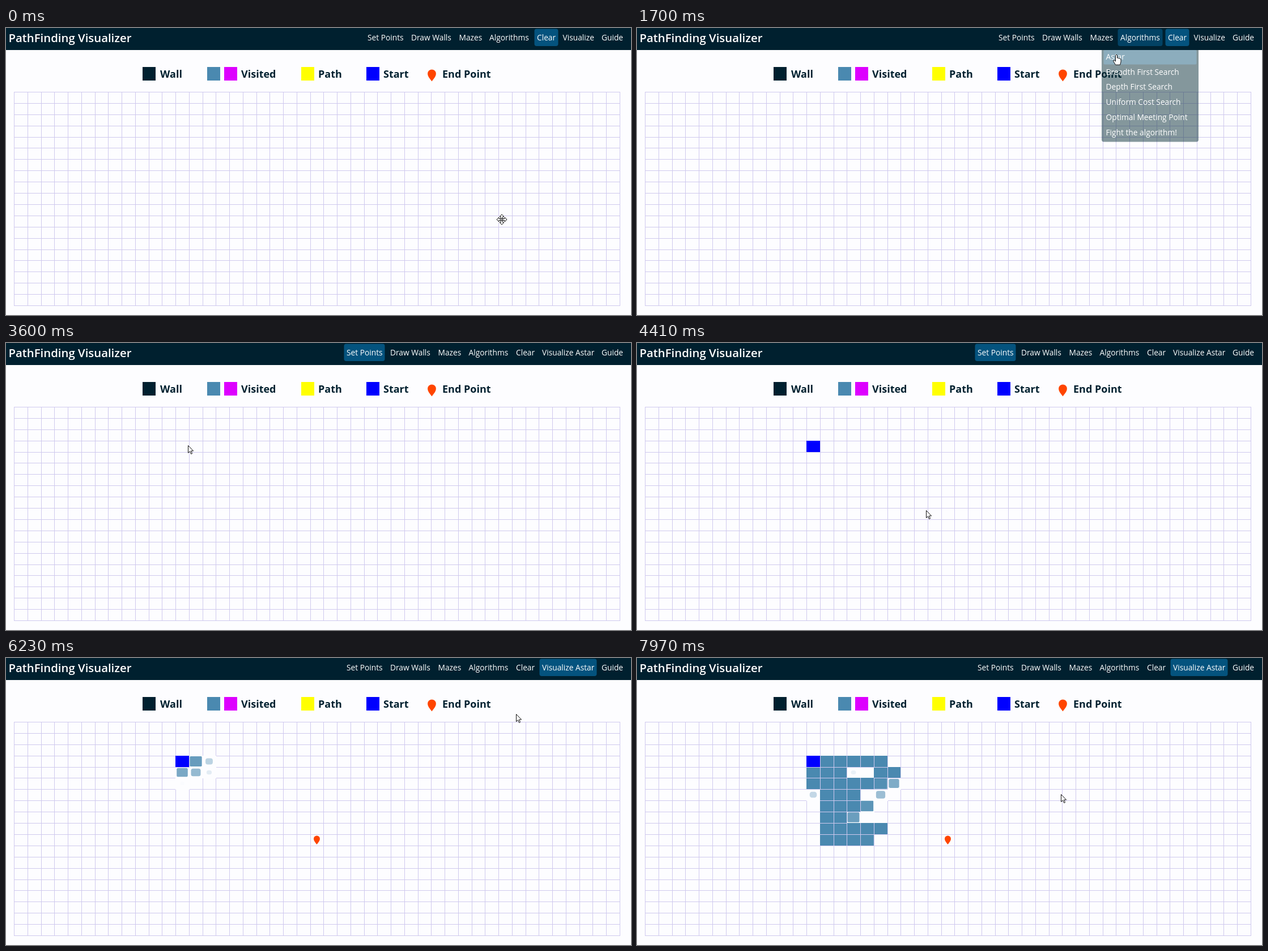
Write an HTML page that moves like this. It is 1103 px wide and 508 px high and loops after 8 s.

```html
<!DOCTYPE html>
<html lang="en">
<head>
<meta charset="utf-8">
<title>PathFinding Visualizer</title>
<style>
  html, body { margin: 0; width: 100%; height: 100%; overflow: hidden; background: #fdfdff; }
  svg { display: block; width: 1103px; height: 508px; font-family: "Open Sans", "Noto Sans", sans-serif; }
  text { white-space: pre; }
  .title { font-size: 20.35px; font-weight: 600; fill: #fff; }
  .item { font-size: 13.75px; fill: #fff; }
  .label { font-size: 18px; font-weight: 700; fill: #00202f; }
</style>
</head>
<body>
<svg id="stage" viewBox="0 0 1103 508"></svg>
<script>
const LOOP = 8000;
const DARK = '#00202f', ACTIVE = '#04537e', VISITED = '#4a89b0', PAPER = '#fdfdff', BLUE = '#0000ff';
const LINE = '#cfc9ee';
const COLS = 45, ROWS = 19, LEFT = 14, TOP = 113, CELL_W = 1069 / COLS, CELL_H = 378 / ROWS;
const PIN = 'M0 10.5C-3 6.3-7.4 1.8-7.4-3.2a7.4 7.4 0 0 1 14.8 0C7.4 1.8 3 6.3 0 10.5Z';

const stage = document.getElementById('stage');

function add(parent, tag, attrs = {}, text) {
  const el = document.createElementNS('http://www.w3.org/2000/svg', tag);
  set(el, attrs);
  if (text) el.textContent = text;
  parent.append(el);
  return el;
}
function set(el, attrs) {
  for (const key in attrs) el.setAttribute(key, attrs[key]);
}
const group = () => add(stage, 'g');
const show = (el, on) => set(el, { opacity: +on });
const clamp = v => Math.max(0, Math.min(1, v));
const ramp = (t, from, to) => clamp((t - from) / (to - from));
const gridX = col => Math.round(LEFT + col * CELL_W);
const gridY = row => Math.round(TOP + row * CELL_H);

// CSS "ease": cubic-bezier(.25, .1, .25, 1)
function ease(p) {
  const bezier = (u, a, b) => 3 * u * (1 - u) ** 2 * a + 3 * u * u * (1 - u) * b + u ** 3;
  let lo = 0, hi = 1;
  for (let i = 0; i < 14; i++) {
    const mid = (lo + hi) / 2;
    if (bezier(mid, .25, .25) < p) lo = mid; else hi = mid;
  }
  return bezier(lo, .1, 1);
}

// Grid
let lines = '';
for (let c = 0; c <= COLS; c++) lines += `M${gridX(c) + .5} ${TOP}V${gridY(ROWS) + 1}`;
for (let r = 0; r <= ROWS; r++) lines += `M${LEFT} ${gridY(r) + .5}H${gridX(COLS) + 1}`;
add(stage, 'path', { d: lines, stroke: LINE, fill: 'none' });

// Cells: a letter for the column ("a" = 12) and a row number
const blankLayer = group(), cellLayer = group(), edgeLayer = group();

function cellBox(name) {
  const col = name.charCodeAt(0) - 85, row = +name.slice(1);
  const x = gridX(col), y = gridY(row);
  return { x, y, width: gridX(col + 1) - x, height: gridY(row + 1) - y };
}
function addBlank({ x, y, width, height }) {
  return add(blankLayer, 'rect', { x, y, width: width + 1, height: height + 1, fill: PAPER });
}
// A filled cell hides its left and top lines; its right and bottom lines stay on top
function addEdge({ x, y, width, height }) {
  const d = `M${x + width + .5} ${y}v${height + .5}h${-width - .5}`;
  return add(edgeLayer, 'path', { d, stroke: LINE, fill: 'none' });
}
function addCell(name, start) {
  const box = cellBox(name);
  return {
    box, start, blank: addBlank(box), edge: addEdge(box),
    fill: add(cellLayer, 'rect', { ...box, fill: VISITED })
  };
}

const FIRST_VISIT = 5960, VISIT_GAP = 51.5, GROW = 500;
const visits = ('b3 a4 b4 c3 c4 a5 b5 c5 d3 c6 c7 e3 d6 d7 c8 f3 b6 d5 f4 c9 b7 d9 c10 ' +
  'b8 e5 b9 d10 e9 g4 b10 f9 e10 f5 e7 d8 g5 f6 a6 d4')
  .split(' ').map((name, i) => addCell(name, FIRST_VISIT + i * VISIT_GAP));

const queued = Object.entries({ d4: 6900, e4: 6900, d8: 6950, e6: 7700, e8: 7700 })
  .map(([name, from]) => ({ from, el: addBlank(cellBox(name)) }));

const startCell = add(cellLayer, 'rect', { ...cellBox('a3'), fill: BLUE });
const startEdge = addEdge(cellBox('a3'));
const endCell = add(cellLayer, 'rect', { ...cellBox('k10'), fill: BLUE });
const endPin = add(cellLayer, 'path', { d: PIN, fill: '#ff4500', transform: 'translate(548.5 322.3) scale(.74)' });

function drawCell({ box, start, blank, edge, fill }, t) {
  const p = ramp(t, start, start + GROW), e = ease(p), scale = .3 + .7 * e;
  const width = box.width * scale, height = box.height * scale, full = e > .95;
  show(blank, p > 0 && !full);
  show(edge, full);
  set(fill, {
    x: box.x + (box.width - width) / 2, y: box.y + (box.height - height) / 2,
    width, height, rx: (1 - e) * width / 2, opacity: p > 0 ? e : 0
  });
}

// Legend
[[241, DARK], [355, VISITED], [385, '#dd00ff'], [521, '#ffff00'], [636, BLUE]]
  .forEach(([x, fill]) => add(stage, 'rect', { x, y: 69, width: 23, height: 24, fill }));
add(stage, 'path', { d: PIN, fill: '#ff4500', transform: 'translate(751.5 84)' });
[[272, 'Wall'], [415, 'Visited'], [551, 'Path'], [666, 'Start'], [770, 'End Point']]
  .forEach(([x, text]) => add(stage, 'text', { x, y: 88, class: 'label' }, text));

// Navigation bar: label, left edge before and after picking, text width
add(stage, 'rect', { width: 1103, height: 39, fill: DARK });
add(stage, 'text', { x: 4.5, y: 25, class: 'title' }, 'PathFinding Visualizer');
const nav = [
  ['Set Points', 638, 601, 63], ['Draw Walls', 715, 678, 71], ['Mazes', 799.5, 762.5, 40],
  ['Algorithms', 853, 816.5, 70], ['Clear', 937, 900, 33], ['Visualize', 982.5, 946, 55], ['Guide', 1051, 1051, 38]
].map(([name, wide, narrow, width]) => ({
  name, wide, narrow, width,
  box: add(stage, 'rect', { y: 1.5, height: 30.5, rx: 4, fill: ACTIVE }),
  label: add(stage, 'text', { y: 22, class: 'item' }, name)
}));

// Algorithm menu
const menu = group();
add(menu, 'path', { d: 'M0 39H171V197.5a4 4 0 0 1-4 4H4a4 4 0 0 1-4-4Z', fill: '#022830', 'fill-opacity': .48 });
const picked = add(menu, 'rect', { x: 3.5, y: 39, width: 164, height: 25.5, rx: 2, fill: '#8fb4c8', 'fill-opacity': .75 });
['Astar', 'Breadth First Search', 'Depth First Search', 'Uniform Cost Search', 'Optimal Meeting Point', 'Fight the algorithm!']
  .forEach((text, i) => add(menu, 'text', { x: 7.5, y: 55.7 + i * 26.8, class: 'item' }, text));

// Pointers, drawn with the hot spot at 0,0
const POINTERS = {
  arrow: 'M.5.5V13.5L3.5 10.8 5.6 15.5 7.6 14.6 5.5 10H9.6Z',
  hand: 'M-1.5 1.2Q0-.8 1.5 1.2V6.2Q3 5.2 4 6.7 5.5 5.9 6.3 7.4 8 7 8 9V13L6.5 18.2H-1.5L-5.2 12Q-6 9.5-3.5 10.2L-1.5 12Z',
  move: [0, 90, 180, 270].map(a => {
    const turn = (x, y) => {
      const r = a * Math.PI / 180, c = Math.cos(r), s = Math.sin(r);
      return `${(x * c - y * s).toFixed(1)} ${(x * s + y * c).toFixed(1)}`;
    };
    return `M${[[0, -9], [4, -5], [1.5, -5], [1.5, -1.5], [-1.5, -1.5], [-1.5, -5], [-4, -5]]
      .map(([x, y]) => turn(x, y)).join('L')}Z`;
  }).join('')
};
const pointer = add(stage, 'path', { fill: '#fff', stroke: '#111', 'stroke-linejoin': 'round' });

const TRACK = [
  [0, 875, 339, 'move'], [130, 875, 339, 'move'], [520, 886, 118, 'arrow'], [740, 892, 34, 'hand'],
  [930, 892, 10, 'hand'], [1150, 892, 10, 'hand'], [1500, 852, 47, 'hand'], [1950, 838, 46, 'hand'],
  [2250, 838, 46, 'hand'], [2470, 766, 42, 'arrow'], [2540, 723, 39, 'arrow'], [2780, 650, 24, 'hand'],
  [2920, 632, 14, 'hand'], [3110, 632, 14, 'hand'], [3200, 580, 34, 'arrow'], [3560, 321, 181, 'arrow'],
  [3940, 321, 181, 'arrow'], [4500, 546, 318, 'arrow'], [4770, 546, 318, 'arrow'], [5220, 945, 64, 'arrow'],
  [5360, 972, 28, 'hand'], [5520, 985, 14, 'hand'], [6000, 985, 14, 'hand'], [6100, 962, 40, 'arrow'],
  [6400, 820, 176, 'arrow'], [6700, 747.5, 241, 'arrow']
];

function drawPointer(t) {
  const i = TRACK.findLastIndex(step => step[0] <= t);
  const [t0, x0, y0, kind] = TRACK[i], [t1, x1, y1] = TRACK[i + 1] || [LOOP, x0, y0];
  const p = ramp(t, t0, t1), x = x0 + (x1 - x0) * p, y = y0 + (y1 - y0) * p;
  set(pointer, { d: POINTERS[kind], transform: `translate(${Math.round(x)} ${Math.round(y)})` });
}

const PICK = 2250, SET_POINTS = 3040, PLACE_START = 3730, PLACE_END = 4700, RUN = 5920;

function drawNav(t) {
  const narrow = t >= PICK;
  const active = t < SET_POINTS ? 'Clear' : t < RUN ? 'Set Points' : 'Visualize';
  const hover = {
    'Algorithms': (.28 * ramp(t, 800, 950) + .4 * ramp(t, 1150, 1500)) * (1 - ramp(t, 2540, 2740)),
    'Set Points': .35 * ramp(t, 2780, 2900),
    'Visualize': .35 * ramp(t, 5360, 5480)
  };
  for (const { name, wide, narrow: near, width, box, label } of nav) {
    const x = narrow ? near : wide, renamed = narrow && name === 'Visualize';
    const text = renamed ? 'Visualize Astar' : name;
    const opacity = name === active ? 1 : t < RUN && hover[name] || 0;
    set(label, { x });
    if (label.textContent !== text) label.textContent = text;
    set(box, { x: x - 4.5, width: (renamed ? 92 : width) + 9, opacity });
  }
  set(menu, {
    transform: `translate(${narrow ? 783 : 820} 0)`,
    opacity: ramp(t, 820, 960) * (1 - ramp(t, 2560, 2720))
  });
  set(picked, { opacity: ramp(t, 1450, 1600) });
}

function draw() {
  const t = performance.now() % LOOP;
  drawNav(t);
  show(startCell, t >= PLACE_START);
  show(startEdge, t >= PLACE_START);
  show(endCell, t >= PLACE_END && t < RUN);
  show(endPin, t >= RUN);
  visits.forEach(cell => drawCell(cell, t));
  queued.forEach(({ from, el }) => show(el, t >= from));
  drawPointer(t);
  requestAnimationFrame(draw);
}
draw();
</script>
</body>
</html>
```
